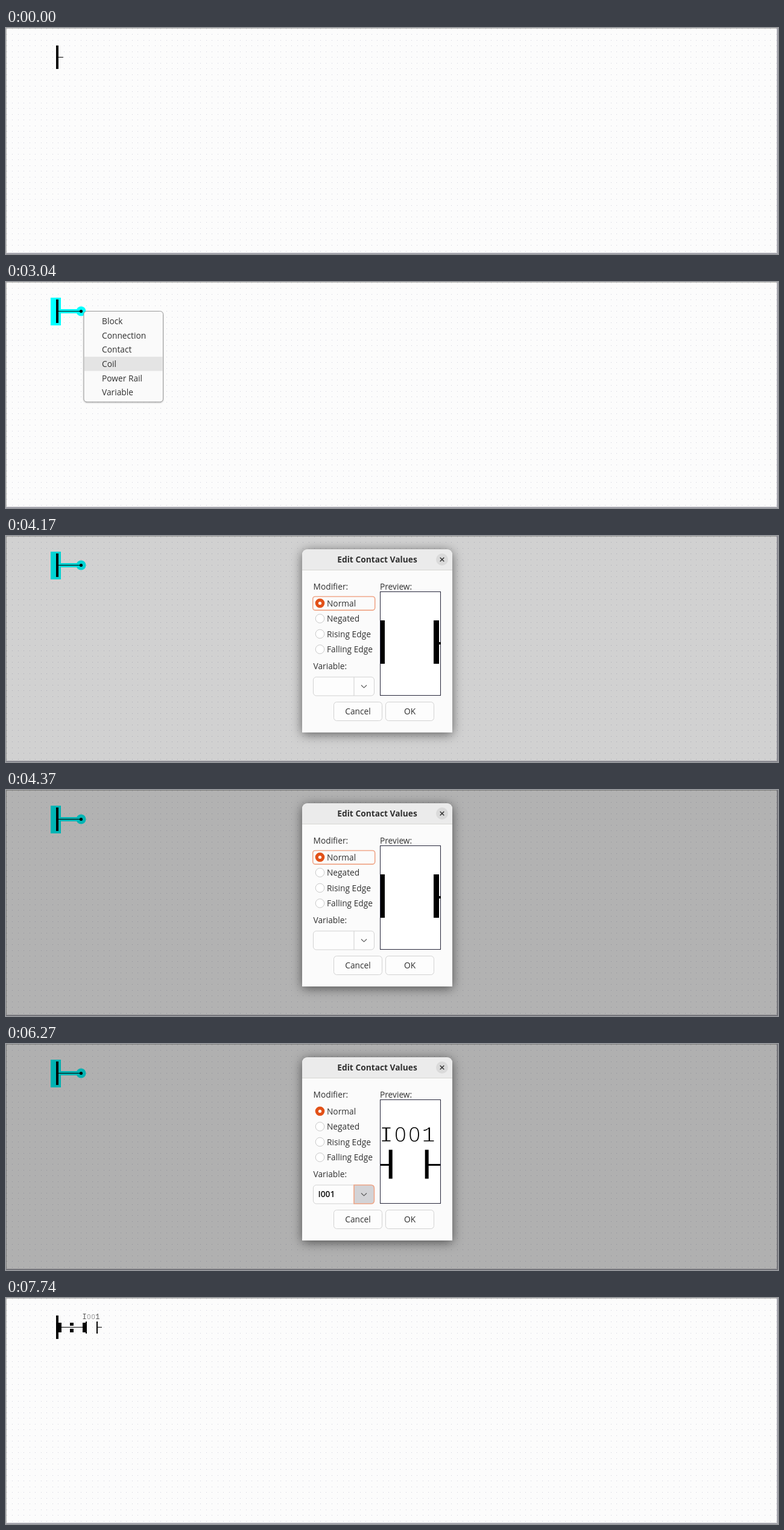
Recreate the animation shown at these times as an HTML page. Size 1280 by 375 pixels, loop 9390 ms.

```html
<!DOCTYPE html>
<html lang="en">
<head>
<meta charset="utf-8">
<title>Ladder editor</title>
<style>
html, body { margin: 0; width: 100%; height: 100%; overflow: hidden; background: #fcfcfc; }
svg { display: block; width: 1280px; height: 375px; }
text { font: 13.75px "Open Sans", "Noto Sans", sans-serif; fill: #303030; white-space: pre; }
.title { font-weight: 700; }
.mid { text-anchor: middle; }
#value { font-weight: 600; fill: #111; }
.tag { font-family: "Liberation Mono", monospace; text-anchor: middle; }
.tag tspan { font-family: "Open Sans", sans-serif; font-weight: 300; font-size: .9em; }
#smallTag { font-size: 12px; fill: #555; }
#bigTag { font-size: 37.5px; fill: #000; stroke: #fff; stroke-width: 1; }
#bigTag tspan { stroke: none; }
.crisp { shape-rendering: crispEdges; }
.line { fill: none; stroke: #cfcfcf; }
.btn { fill: #fdfdfd; stroke: #d2d2d2; }
.ring { fill: none; stroke: #f0a688; stroke-width: 1.6; }
#frame { fill: #fbfbfb; filter: drop-shadow(0 3px 9px rgba(0, 0, 0, .55)); }
#menuBox { fill: #fafafa; stroke: #9c9c9c; filter: drop-shadow(0 1px 1px rgba(0, 0, 0, .25)); }
</style>
</head>
<body>
<svg viewBox="0 0 1280 375" xmlns="http://www.w3.org/2000/svg">
  <rect width="1280" height="375" fill="#fcfcfc"/>
  <path id="dots" class="crisp" fill="#d0d0dc"/>

  <g id="glow" fill="#0ff">
    <rect x="74" y="26" width="17" height="46"/>
    <rect id="glowWire" x="90" y="45" height="7"/>
    <circle id="glowEnd" cy="48.5" r="8"/>
  </g>
  <rect x="83" y="29" width="4" height="39" class="crisp"/>
  <rect id="wire" x="87" y="48" height="1" class="crisp"/>
  <circle id="wireEnd" cy="48.5" r="2.6"/>

  <g id="contact">
    <path class="crisp" d="M87 41h5v16h-5zM106 41h6v5h-6zM106 51h6v6h-6zM127 41h5v16h-5zM132 39h2v20h-2zM150 39h2v20h-2zM152 48h7v1h-7z"/>
    <text id="smallTag" class="tag" y="34.5">I<tspan>00</tspan>1</text>
  </g>

  <g class="crisp">
    <path d="M0 0h1280v1h-1280zM0 0h1v375h-1z" fill="#b4b4b0"/>
    <path d="M0 373h1280v2h-1280zM1278 0h2v375h-2z" fill="#a6a6ae"/>
  </g>

  <g id="menu">
    <rect id="menuBox" x="129" y="48.5" width="131.5" height="150.5" rx="5"/>
    <rect id="hover" x="130" width="129.5" height="23.6" fill="#e4e4e4"/>
  </g>

  <rect id="shade" width="1280" height="375"/>

  <g id="dialog">
    <path id="frame" d="M491 326V32q0-10 10-10H730q10 0 10 10V326z"/>
    <path d="M491 56V32q0-10 10-10H730q10 0 10 10V56z" fill="#ebebeb"/>
    <path d="M491 56.5H740" stroke="#d6d6d2"/>
    <text class="title mid" x="615.5" y="43.5">Edit Contact Values</text>
    <circle cx="723" cy="39" r="10" fill="#dadada"/>
    <path d="M719.7 35.7l6.6 6.6m0-6.6l-6.6 6.6" stroke="#333" stroke-width="1.5"/>

    <text x="509.5" y="89">Modifier:</text>
    <g id="radios"></g>
    <rect id="radioRing" class="ring" x="508.7" y="100.5" width="103" height="22.6" rx="4"/>

    <text x="509.5" y="221">Variable:</text>
    <rect class="btn" x="509.5" y="234" width="101" height="31" rx="5"/>
    <path id="arrowBg" d="M577 234h28q5.5 0 5.5 5.5v20q0 5.5-5.5 5.5h-28z" fill="#d3d3d6"/>
    <path class="line" d="M577 234v31"/>
    <path id="arrowRing" class="ring" d="M577 234h28q5.5 0 5.5 5.5v20q0 5.5-5.5 5.5h-28z"/>
    <path d="M589 247.5l4.5 4.3 4.5-4.3" fill="none" stroke="#555" stroke-width="1.1"/>
    <text id="value" x="517.5" y="254">I001</text>

    <text x="620" y="89">Preview:</text>
    <rect x="620.5" y="92.5" width="100" height="172" fill="#fff" stroke="#26263a"/>
    <path id="blank" class="crisp" d="M621 140h7v72h-7zM709 140h9v72h-9zM718 176h3v4h-3z"/>
    <g id="filled">
      <path d="M621 199h14v3h-14zM634.7 175.5h6v48h-6zM694.7 175.5h6v48h-6zM700 199h20v3h-20z"/>
      <text id="bigTag" class="tag" y="162">I<tspan>00</tspan>1</text>
    </g>

    <rect class="btn" x="543.5" y="275.5" width="80" height="31" rx="5"/>
    <rect class="btn" x="629.5" y="275.5" width="80" height="31" rx="5"/>
    <rect id="okHover" x="630" y="276" width="79" height="30" rx="4.5" fill="#ececec"/>
    <text class="mid" x="583.5" y="296">Cancel</text>
    <text class="mid" x="669.5" y="296">OK</text>
  </g>
</svg>
<script>
const LOOP = 9390;
const $ = id => document.getElementById(id);
const set = (id, attrs) => {
  for (const k in attrs) $(id).setAttribute(k, attrs[k]);
};
const show = (id, on) => set(id, { visibility: on ? "inherit" : "hidden" });
const ramp = (t, start, dur) => Math.min(1, Math.max(0, (t - start) / dur));
const easeOut = p => 1 - (1 - p) * (1 - p);
// value of the last [time, value] step reached
const step = (t, list, value) => {
  for (const [at, v] of list) if (t >= at) value = v;
  return value;
};

function buildDots() {
  const pitch = 9.45;
  let d = "";
  for (let y = 1; y < 373; y += pitch)
    for (let x = 1; x < 1278; x += pitch)
      d += `M${Math.round(x)} ${Math.round(y)}h1v1h-1z`;
  set("dots", { d });
}

const spread = (id, x, gap) =>
  set(id, { x: [0, 1, 2, 3].map(i => x + i * gap).join(" ") });

const ROW = 23.65, rowTop = i => 53 + i * ROW;

function buildLabels() {
  ["Block", "Connection", "Contact", "Coil", "Power Rail", "Variable"].forEach((s, i) =>
    $("menu").insertAdjacentHTML("beforeend",
      `<text x="159" y="${rowTop(i) + 17}">${s}</text>`));
  ["Normal", "Negated", "Rising Edge", "Falling Edge"].forEach((s, i) => {
    const y = 111.5 + i * 25.5;
    const mark = i
      ? `<circle cx="520.5" cy="${y}" r="7.3" fill="#fff" stroke="#c8c8c8"/>`
      : `<circle cx="520.5" cy="${y}" r="7.8" fill="#e25118"/><circle cx="520.5" cy="${y}" r="2.6" fill="#fff"/>`;
    $("radios").insertAdjacentHTML("beforeend", `${mark}<text x="532" y="${y + 5}">${s}</text>`);
  });
}

const drag = [[1290, 104], [1380, 112], [1470, 119], [1560, 124.5]];
const hovers = [[2230, 0], [2620, 3], [2780, 4], [3040, 3], [3390, 2]];
const OPEN = 3876, CLOSE = 7007;

function drawDiagram(t) {
  const done = t >= 7000;
  const lit = t >= 740 && !done;
  const pulled = t >= 1290 && !done;
  const end = done ? 132 : step(t, drag, 95);
  show("glow", lit);
  show("glowEnd", lit && pulled);
  show("wireEnd", pulled);
  show("contact", done);
  set("glowWire", { width: end - 90 });
  set("wire", { width: end - 87 });
  set("glowEnd", { cx: end });
  set("wireEnd", { cx: end });
}

function drawMenu(t) {
  const open = t >= 1740 && t < 3770;
  const row = step(t, hovers, -1);
  show("menu", open);
  show("hover", open && row >= 0);
  set("hover", { y: rowTop(Math.max(0, row)) });
}

function drawDialog(t) {
  const dim = ramp(t, 3888, 490) - ramp(t, 7023, 240);
  set("shade", { opacity: 0.3 * dim });

  const grow = easeOut(ramp(t, OPEN, 150));
  const shut = easeOut(ramp(t, CLOSE, 100));
  const scale = grow * (1 - shut);
  const pivot = t < CLOSE ? 174 : 176.5;
  $("dialog").style.display = scale > 0.001 ? "" : "none";
  set("dialog", {
    opacity: grow,
    transform: `translate(0 ${pivot}) scale(1 ${Math.max(scale, 0.001)}) translate(0 -174)`
  });

  const picked = t >= 6270;
  show("radioRing", t < 5230);
  show("arrowRing", t >= 5230);
  set("arrowBg", { opacity: ramp(t, 5000, 200) * (1 - ramp(t, 6300, 200)) });
  show("value", picked);
  show("filled", picked);
  show("blank", !picked);
  set("okHover", { opacity: ramp(t, 6530, 200) });
}

function draw(now) {
  const t = now % LOOP;
  drawDiagram(t);
  drawMenu(t);
  drawDialog(t);
}

buildDots();
buildLabels();
spread("smallTag", 130, 7.3);
spread("bigTag", 630.5, 23.3);

let start;
function tick(now) {
  start ??= now;
  draw(now - start);
  requestAnimationFrame(tick);
}
draw(0);
requestAnimationFrame(tick);
</script>
</body>
</html>
```
